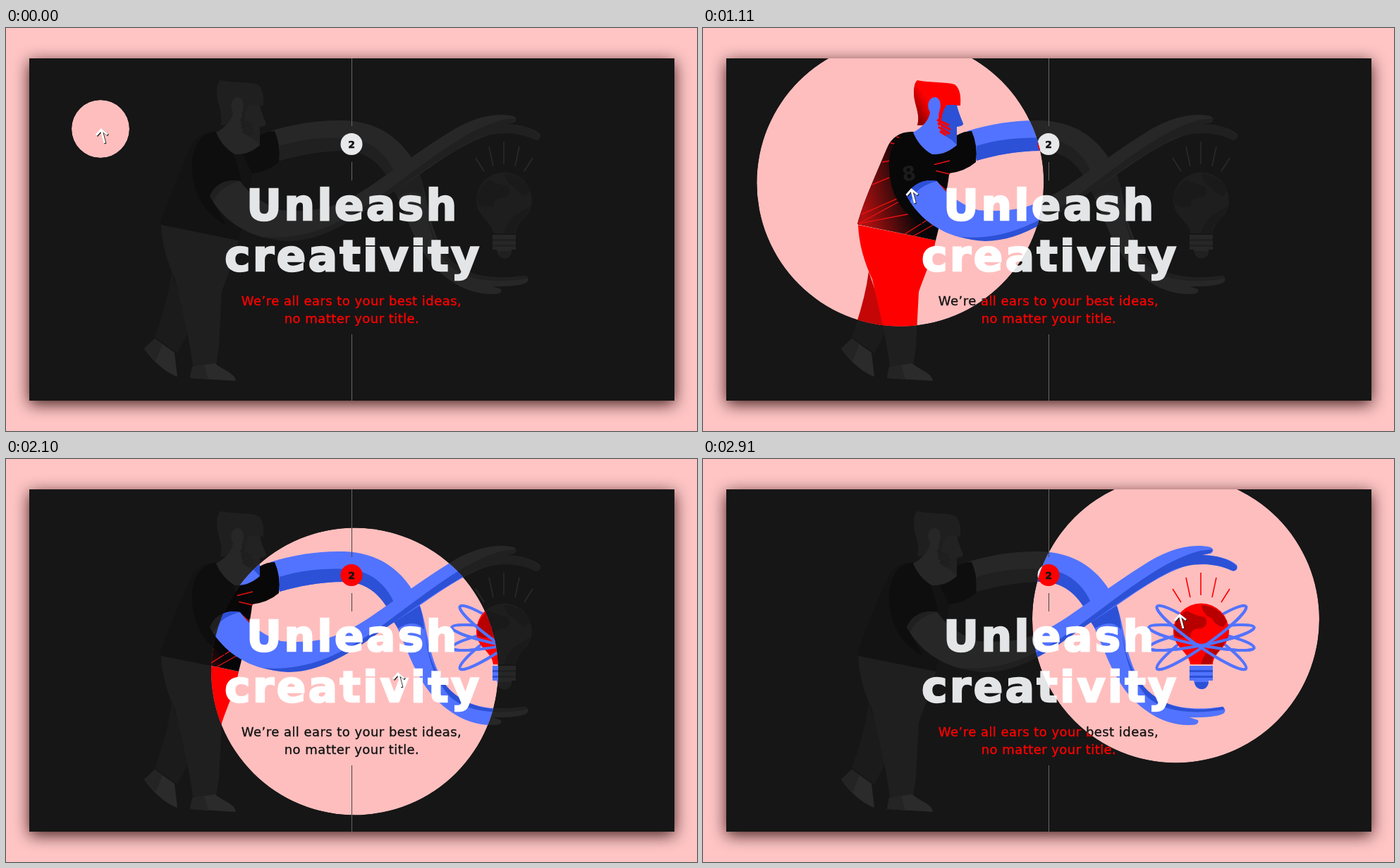
Write an HTML page that moves like this. It is 980 px wide and 571 px high and loops after 2.94 s.

```html
<!DOCTYPE html>
<html lang="en">
<head>
<meta charset="utf-8">
<title>Unleash creativity</title>
<style>
html, body { margin: 0; width: 100%; height: 100%; overflow: hidden; background: #ffc4c4; }
svg { display: block; width: 980px; height: 571px; }
.dark {
  --skin: #272727; --shade: #202020; --face: #222; --red: #1f1f1f; --leg: #1b1b1b; --hair: #1f1f1f;
  --shirt: #131313; --sleeve: #0e0e0e; --bulb: #1e1e1e; --patch: #1a1a1a; --ray: #2a2a2a; --lit: 0;
  --title: #e4e5e6; --sub: #f00; --badge: #e8e9ea; --line: #666;
}
.lit {
  --skin: #5273ff; --shade: #2c51d6; --face: #2c51d6; --red: #f00; --leg: #c40606; --hair: #f00;
  --shirt: #060608; --sleeve: #080808; --bulb: #f00; --patch: #b80000; --ray: #f00; --lit: 1;
  --title: #fff; --sub: #141414; --badge: #f00; --line: #4a4444;
}
.skin { fill: var(--skin); }
.shade { fill: var(--shade); }
.face { fill: var(--face); }
.red { fill: var(--red); }
.leg { fill: var(--leg); }
.hair { fill: var(--hair); }
.shirt { fill: var(--shirt); }
.sleeve { fill: var(--sleeve); }
.bulb { fill: var(--bulb); }
.patch { fill: var(--patch); }
.glow { opacity: var(--lit); }
.badge { fill: var(--badge); }
.line { stroke: var(--line); }
.rays { stroke: var(--ray); stroke-width: 1.6; }
.beard { stroke: var(--hair); stroke-width: 3.4; }
.stripes { stroke: #e81010; stroke-width: 1.4; fill: none; }
.rings { stroke: #5273ff; stroke-width: 4; fill: none; }
text { text-anchor: middle; font-family: "DejaVu Sans", Verdana, sans-serif; }
.title { font-size: 61px; font-weight: 700; letter-spacing: 3.6px; fill: var(--title); stroke: var(--title); stroke-width: 2.6px; }
.sub { font-size: 18px; letter-spacing: .45px; fill: var(--sub); stroke: var(--sub); stroke-width: .35px; }
</style>
</head>
<body>
<svg viewBox="0 0 980 571">
<defs>
  <filter id="shadow" x="-10%" y="-15%" width="120%" height="130%">
    <feDropShadow dx="0" dy="5" stdDeviation="11" flood-color="#200" flood-opacity=".85"/>
  </filter>
  <linearGradient id="back" gradientUnits="userSpaceOnUse" x1="222" y1="240" x2="292" y2="222">
    <stop stop-color="#b01010"/><stop offset="1" stop-color="#b01010" stop-opacity="0"/>
  </linearGradient>
  <linearGradient id="nape" gradientUnits="userSpaceOnUse" x1="299" y1="118" x2="320" y2="106">
    <stop stop-color="#8c0000"/><stop offset="1" stop-color="#8c0000" stop-opacity="0"/>
  </linearGradient>
  <clipPath id="card"><rect x="33" y="43" width="915" height="485"/></clipPath>
  <clipPath id="lens"><circle class="spot"/></clipPath>
  <path id="torso" d="M299 147C280 146 267 155 261 170C243 213 226 250 219 278L330 301C338 270 346 235 350 200L345 172L335 178C315 178 303 160 299 147Z"/>
  <path id="hair" d="M304 74C322 78 345 76 357 80C365 86 366 98 365 110L346 109C340 118 343 128 338 136L304 138C309 122 299 108 299 92C299 82 301 76 304 74Z"/>
  <ellipse id="steep" rx="77" ry="12"/>
  <ellipse id="flat" rx="76" ry="11"/>
  <path id="steepFront" d="M-77 0A77 12 0 0 0 77 0"/>
  <path id="flatFront" d="M-76 0A76 11 0 0 0 76 0"/>

  <g id="art">
    <!-- far arm -->
    <path class="skin" d="M375 146C410 135 445 130 480 131C530 133 562 158 582 195C600 235 595 275 622 318C645 352 690 358 736 351Q743 354 739 360Q728 367 690 366L702 370Q705 377 690 377C650 378 612 350 592 318C572 285 566 262 553 235C540 200 520 177 485 174C450 173 415 180 388 188Z"/>
    <path class="shade" d="M388 167C420 157 455 154 488 156C520 160 540 180 550 203L540 210C528 190 510 176 485 174C450 173 415 180 388 188Z"/>
    <path class="shade" d="M548 228L585 203Q592 220 593 242Q580 225 556 240Z"/>
    <path class="shade" d="M594 240C598 285 615 325 655 345C680 356 710 357 738 351L739 355C690 363 650 357 628 335C603 305 596 270 594 240Z"/>

    <!-- legs and shoes -->
    <path class="leg" d="M235 345Q230 385 211 438L243 461L262 425Z"/>
    <path class="red" d="M220 279L330 301C325 328 314 350 306 374L302 452L298 478L265 479C260 440 249 395 240 356C228 330 221 305 220 279Z"/>
    <path fill="#2b2b2b" d="M211 440L239 460L243 494C225 488 205 468 196 454Z"/>
    <path fill="#2b2b2b" d="M264 480L297 475C305 484 325 488 326 500L261 496Z"/>
    <path fill="#242424" d="M211 440L222 448L212 472L196 454ZM264 480L281 477L287 498L261 496Z"/>

    <!-- shirt -->
    <use href="#torso" class="shirt"/>
    <path class="sleeve" d="M335 178L360 165V152Q370 146 381 146Q390 166 387 190Q372 203 349 206Z"/>
    <g class="glow">
      <use href="#torso" fill="url(#back)"/>
      <path class="stripes" d="M221 277L278 246M221 277L300 262M225 264L284 238M240 222L264 212M254 190L266 188M266 163L298 168M274 154L325 172M300 150L322 157M318 196L350 188M320 200L350 207M322 210L347 232M286 292L318 272M298 295L332 276"/>
    </g>
    <path class="sleeve" d="M299 147C276 147 262 172 264 200C266 240 285 265 312 279L289 238C298 222 312 214 333 217C330 190 316 160 299 147Z"/>
    <text class="glow" x="292" y="216" font-size="28" font-weight="700" fill="#1c1c1c" transform="rotate(-8 292 206)">8</text>

    <!-- head -->
    <use href="#hair" class="hair"/>
    <use href="#hair" class="glow" fill="url(#nape)"/>
    <path class="face" d="M346 109L360 109C362 118 366 128 369 135Q370 139 360 140L360 166L335 162L338 130Q340 115 346 109Z"/>
    <path class="skin" d="M298 148C312 140 321 130 322 119C316 109 321 98 329 98C338 99 338 112 335 119C332 134 336 150 352 158L360 166C350 174 340 180 325 179C312 172 303 160 298 148Z"/>
    <path class="beard" d="M332 130L349 138M333 135L351 144M334 140L350 150M336 146L345 152"/>

    <!-- near arm -->
    <path class="skin" d="M332 217C312 213 296 222 289 238C305 270 345 302 400 300C460 296 520 250 580 212C620 185 660 155 700 148C720 146 735 152 752 159Q760 157 757 150C745 140 725 136 705 136L720 134Q727 129 720 125C690 118 655 130 625 150C585 175 545 205 515 225C470 255 440 262 390 258C365 250 345 235 332 217Z"/>
    <path class="shade" d="M365 296C455 304 520 245 575 205C620 172 660 142 705 130L722 128Q725 133 708 136C730 137 748 142 757 152Q758 159 750 158C720 145 690 148 665 158C620 180 575 215 530 245C480 282 440 302 400 302Q380 301 365 296Z"/>
    <path class="shade" d="M332 217C312 213 296 222 289 238L294 246C300 231 312 222 332 217Z"/>

    <!-- bulb -->
    <path class="rays" d="M706 161V193M685 168L691 196M728 168L722 196M666 184L678 203M747 184L735 203"/>
    <g class="rings glow" transform="translate(707 253)">
      <use href="#steep" transform="rotate(35)"/><use href="#steep" transform="rotate(-35)"/>
      <use href="#flat" transform="rotate(11)"/><use href="#flat" transform="rotate(-11)"/>
    </g>
    <path class="bulb" d="M691 291C689 272 667 268 667 244A39 39 0 0 1 746 244C746 268 724 272 723 291Z"/>
    <path class="patch" d="M668 240Q672 222 686 215Q698 222 712 224Q718 236 707 240Q690 240 692 252Q678 256 669 250ZM707 207Q732 208 743 230L738 238Q726 236 722 226Q708 220 707 207ZM744 252Q738 268 724 280L721 291H706Q712 270 728 262Z"/>
    <path class="skin" d="M690 293H723V314H717A10 10 0 0 1 697 318L696 314H690Z"/>
    <path class="shade" d="M690 299H723V302H690ZM690 307H723V310H690ZM697 316H717Q715 326 707 326Q699 325 697 316Z"/>
    <g class="rings glow" transform="translate(707 253)">
      <use href="#steepFront" transform="rotate(35)"/><use href="#steepFront" transform="rotate(-35)"/>
      <use href="#flatFront" transform="rotate(11)"/><use href="#flatFront" transform="rotate(-11)"/>
    </g>

    <!-- copy -->
    <path class="line" d="M490.5 43V139M490.5 190V216M490.5 434V528"/>
    <circle class="badge" cx="490" cy="164.500" r="15.500"/>
    <text x="490" y="169.500" font-size="14" font-weight="700" fill="#161616" stroke="#161616" stroke-width=".5">2</text>
    <text class="title" x="492" y="272">Unleash</text>
    <text class="title" x="492.500" y="344">creativity</text>
    <text class="sub" x="490" y="393">We’re all ears to your best ideas,</text>
    <text class="sub" x="490.500" y="418">no matter your title.</text>
  </g>
  <path id="arrow" d="M5 20L0 1M-7 9L0 1L9 8" fill="none"/>
</defs>

<rect x="33" y="43" width="915" height="485" fill="#141414" filter="url(#shadow)"/>
<g clip-path="url(#card)">
  <use href="#art" class="dark"/>
  <g clip-path="url(#lens)">
    <circle class="spot" fill="#ffbebe"/>
    <use href="#art" class="lit"/>
  </g>
</g>
<g id="pointer">
  <use href="#arrow" x="1" y="1" stroke="#222" stroke-width="3"/>
  <use href="#arrow" stroke="#fff" stroke-width="2.800"/>
</g>
</svg>
<script>
const LOOP = 2940, STEP = 30;
// time, spotlight x and y, pointer x and y
const keys = [
  [0, 134, 143, 135, 143],
  [600, 191, 169, 221, 184],
  [840, 232, 187, 261, 199],
  [1410, 316.5, 249.5, 324, 256],
  [1620, 322, 256, 334, 262],
  [2100, 494.5, 301, 556, 303],
  [2160, 526, 302.5, 568, 304],
  [2520, 576, 293.5, 641, 260],
  [2700, 637, 255, 668, 230],
  [2910, 670.5, 227, 676, 220]
];
const spots = document.querySelectorAll('.spot');
const pointer = document.getElementById('pointer');

const secant = (i, c) => (keys[i + 1][c] - keys[i][c]) / (keys[i + 1][0] - keys[i][0]);

// Harmonic mean keeps the curve from overshooting its keys
function slope(i, c) {
  if (i === 0) return 0;
  if (i === keys.length - 1) return secant(i - 1, c);
  const a = secant(i - 1, c), b = secant(i, c);
  return a * b > 0 ? 2 * a * b / (a + b) : 0;
}

function track(t, c) {
  let i = keys.length - 2;
  while (i > 0 && keys[i][0] > t) i--;
  const span = keys[i + 1][0] - keys[i][0];
  const u = Math.min(1, (t - keys[i][0]) / span), v = 1 - u;
  return v * v * (1 + 2 * u) * keys[i][c] + u * u * (3 - 2 * u) * keys[i + 1][c]
    + span * u * v * (v * slope(i, c) - u * slope(i + 1, c));
}

function radius(t) {
  const p = Math.max(0, Math.min(1, (t - 560) / 415));
  return 41 + 162.5 * (p < .5 ? 2 * p * p : 1 - 2 * (1 - p) ** 2);
}

function draw(now) {
  const t = Math.floor(now % LOOP / STEP) * STEP;
  for (const spot of spots) {
    spot.setAttribute('cx', track(t, 1));
    spot.setAttribute('cy', track(t, 2));
    spot.setAttribute('r', radius(t));
  }
  pointer.setAttribute('transform', `translate(${track(t, 3)} ${track(t, 4)})`);
}

const start = performance.now();
function frame() {
  draw(performance.now() - start);
  requestAnimationFrame(frame);
}
frame();
</script>
</body>
</html>
```
